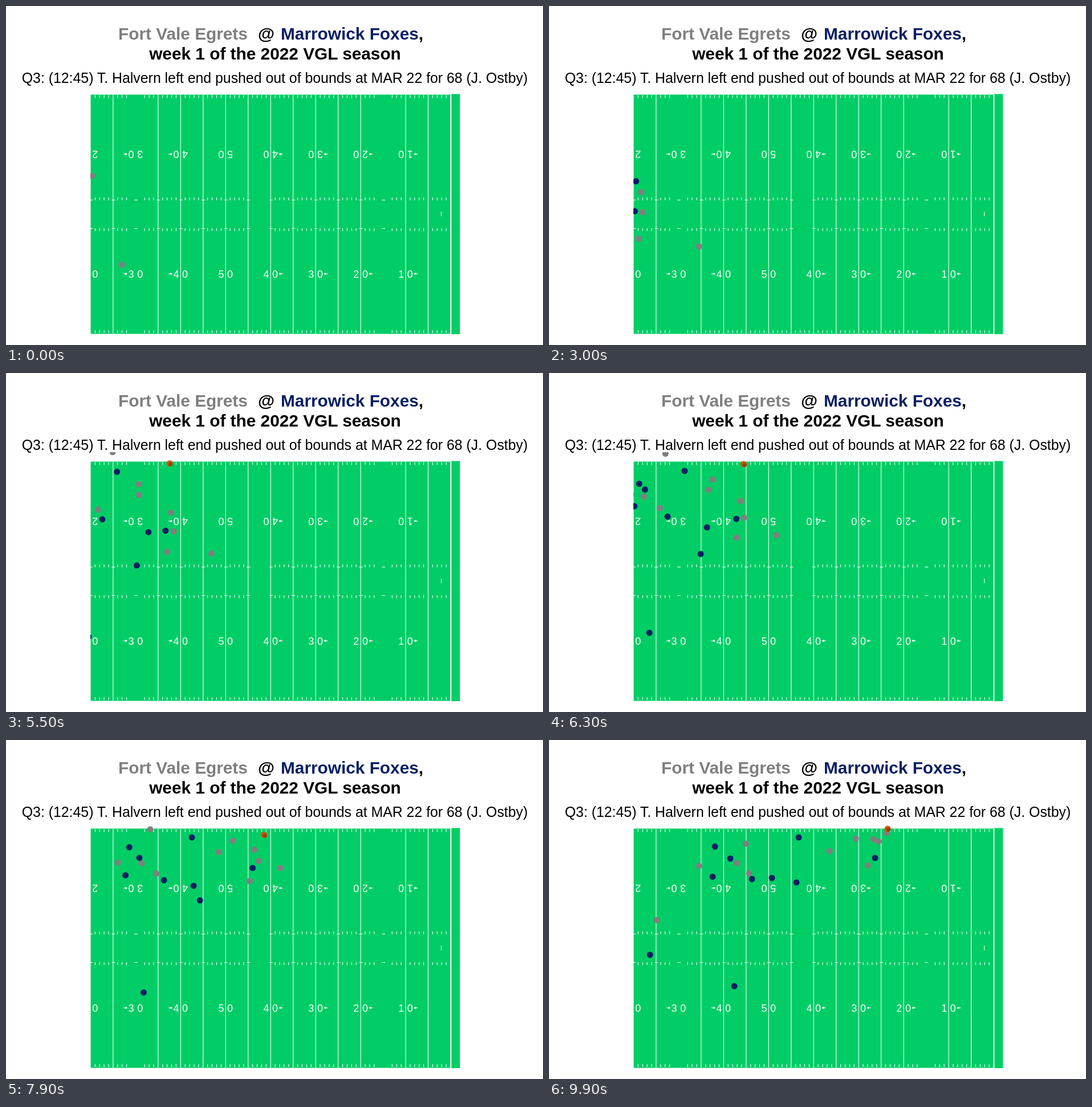
Recreate the animation shown at these times as an HTML page. Size 942 by 595 pixels, loop 10000 ms.

```html
<!DOCTYPE html>
<html lang="en">
<head>
<meta charset="utf-8">
<title>Play animation</title>
<style>
  html, body { margin: 0; width: 100%; height: 100%; overflow: hidden; background: #fff; }
  svg { display: block; width: 942px; height: 595px; }
  text { font-family: "Liberation Sans", Arial, sans-serif; }
  .title { font-size: 29.8px; font-weight: bold; }
  .play { font-size: 24.85px; text-anchor: middle; }
  .num { font-size: 18px; fill: #fff; text-anchor: middle; }
</style>
</head>
<body>
<svg viewBox="0 0 942 595">
  <defs>
    <clipPath id="panel"><rect x="148" y="139" width="649" height="438"/></clipPath>
  </defs>
  <text class="title" x="197" y="59" fill="#7f7f7f">Fort Vale Egrets</text>
  <text class="title" x="442" y="59">@</text>
  <text class="title" x="482" y="59"><tspan fill="#0a1f62">Marrowick Foxes</tspan>,</text>
  <text class="title" x="472" y="94" text-anchor="middle">week 1 of the 2022 VGL season</text>
  <text class="play" x="471.5" y="135">Q3: (12:45) T. Halvern left end pushed out of bounds at MAR 22 for 68 (J. Ostby)</text>
  <g clip-path="url(#panel)">
    <g id="field"></g>
    <g id="dots"></g>
  </g>
</svg>
<script>
const LOOP = 10000, STEP = 100, END = 9.9;
const GRAY = '#7f7f7f', NAVY = '#0a1f62', ORANGE = '#d45500', BROWN = '#9c3c00';
const field = document.getElementById('field');
const dots = document.getElementById('dots');

function add(parent, tag, attrs, text) {
  const el = document.createElementNS('http://www.w3.org/2000/svg', tag);
  for (const k in attrs) el.setAttribute(k, attrs[k]);
  if (text) el.textContent = text;
  parent.appendChild(el);
  return el;
}
const box = (x, y, width, height, fill = '#fff') =>
  add(field, 'rect', { x, y, width, height, fill });
const upright = (x, y, height, width = 1.07) => box(x - width / 2, y, width, height);

// Pixel column of a distance in yards from the right goal line
const yardX = n => 780 - 7.895 * n;

function drawField() {
  box(148.5, 155.5, 632, 420, '#00cd66');
  box(781, 154.5, 15.3, 421.5, '#00cd66');
  upright(780.3, 155.5, 420, 2.1);

  for (let n = 1; n < 80; n++) {
    const x = yardX(n), gap = Math.min(Math.abs(n - 15), Math.abs(n - 70));
    if (gap < 2) continue;
    if (n % 5 === 0) {
      upright(x, 156, 419);
      continue;
    }
    for (const y of [156.5, 569]) upright(x, y, 5);
    if (n < 41 || n > 44) for (const y of [336, 390]) upright(x, y, 5);
  }
  for (let n = 15; n <= 80; n += 5)
    for (const y of [340, 390]) box(yardX(n) - 2.5, y, 6, 1.07);
  upright(763.7, 361, 8);

  for (let n = 10; n <= 80; n += 10) {
    const x = yardX(n), side = Math.sign(50 - n);
    for (const [y, turn] of [[470.5, 0], [260.5, 180]]) {
      const g = add(field, 'g', { transform: `translate(${x} ${y}) rotate(${turn})` });
      add(g, 'text', { class: 'num', x: -7.8, y: 6.5 }, String(5 - Math.abs(50 - n) / 10));
      add(g, 'text', { class: 'num', x: 7.8, y: 6.5 }, '0');
      if (!side) continue;
      box(x + side * 18 - 3.5, y - 1, 7, 1.07);
      box(x + side * 17 - 1.5, y - 2, 3, 3);
    }
  }
}

const movers = [];
function mover(fill, from, to, at, r = 5.5) {
  movers.push({ from, to, at, el: add(dots, 'circle', { r, fill }) });
}

// pace > 1 speeds up along the field; bend > 1 turns upfield early
function run(fill, from, [x0, y0], [x1, y1], pace, bend) {
  mover(fill, from, END, t => {
    const u = (t - from) / (END - from);
    return [x0 + (x1 - x0) * u ** pace, y1 + (y0 - y1) * (1 - u) ** bend];
  });
}

// Players entering at the left edge: entry time, entry y, final x, final y, bend
const LEFT = 141;
function squad(fill, pace, players) {
  for (const [from, y, x1, y1, bend] of players)
    run(fill, from, [LEFT, y], [x1, y1], pace, bend);
}

// Back and wide player before the play reaches the visible part
mover(GRAY, 0, 0.6, t => [151 - 17 * t, 298 - 15 * t]);
mover(GRAY, 0, 2.95, t => [203 + 20 * t, 454 + 30.6 * t - 13.75 * t * t]);
run(GRAY, 3, [263, 422], [592, 163], 1.2, 1.16);

squad(GRAY, 1.2, [
  [2.4, 350, 569, 174, 1.7],
  [2.35, 386, 578, 178, 1.36],
  [2.5, 430, 559, 220, 1.55]
]);
squad(GRAY, 1.03, [
  [4.1, 215, 538, 173, 2.3],
  [3.85, 246, 492, 195, 3.1],
  [6.2, 213, 263, 221, 0.5],
  [5.7, 217, 329, 216, 1],
  [5, 242, 351, 234, 3],
  [8, 325, 189, 316, 1]
]);
// Drifts over the sideline and comes back
mover(GRAY, 3.3, END, t => {
  const u = (t - 3.2) / (END - 3.2);
  return [LEFT + 204 * u - 34 * Math.sin(Math.PI * u ** 1.3),
          138 + 6.8 * Math.abs(t - 5.7) ** 1.3];
});

squad(NAVY, 1.2, [[2.7, 372, 572, 207, 1.75]]);
squad(NAVY, 1.03, [
  [4.47, 178, 438, 171, 5],
  [5.8, 198, 291, 187, 3],
  [5.6, 203, 318, 208, 2],
  [6.05, 233, 287, 240, 1.5],
  [3.5, 393, 434, 250, 1.3],
  [5.4, 464, 325, 432, 1.3],
  [8.8, 381, 177, 377, 1]
]);
squad(NAVY, 0.86, [
  [2.8, 310, 391, 242, 1.25],
  [5.05, 260, 356, 244, 2.3]
]);

// Runner hugging the sideline, with the ball on top
function carrier(t) {
  const u = (t - 3.2) / (END - 3.2);
  return [139 + 455 * u ** 1.05,
          156 + 22 * (1 - u) ** 7 + 12 * Math.sin(Math.PI * u ** 3)];
}
mover(ORANGE, 3.2, END, carrier);
mover(BROWN, 3.2, END, t => carrier(t).map(v => v + 1.5), 3.5);

function draw(t) {
  for (const { from, to, at, el } of movers) {
    const on = t >= from && t <= to;
    el.style.display = on ? '' : 'none';
    if (!on) continue;
    const [x, y] = at(t);
    el.setAttribute('cx', x.toFixed(2));
    el.setAttribute('cy', y.toFixed(2));
  }
}

drawField();
const begin = performance.now();
function tick() {
  const ms = (performance.now() - begin) % LOOP;
  draw(Math.floor(ms / STEP) * STEP / 1000);
  requestAnimationFrame(tick);
}
draw(0);
requestAnimationFrame(tick);
</script>
</body>
</html>
```
